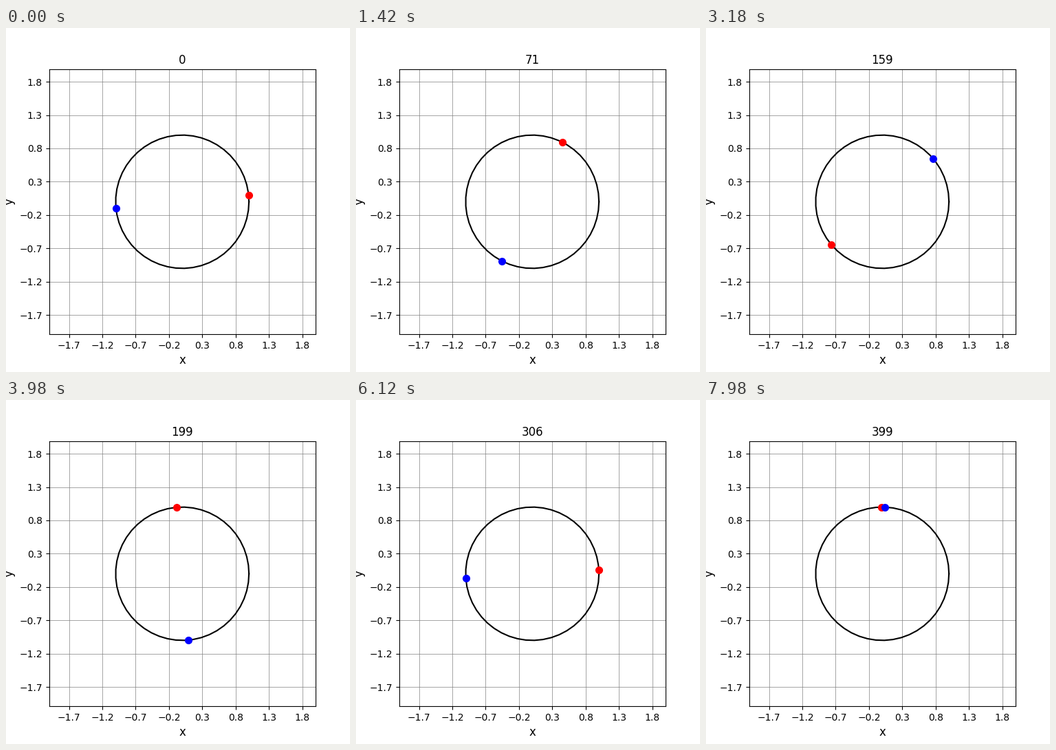
Recreate the animation shown at these times as a matplotlib script. Size 500 px wide and 500 px high, loop 8 s.

```python
import numpy as np
import matplotlib.pyplot as plt
from matplotlib.animation import FuncAnimation

FRAMES = 400
STEP = 0.1       # natural phase advance per step
COUPLING = 0.05  # pull between the two oscillators per step
LAG = 0.0508     # phase lag in the coupling


def simulate(frames):
    """Two lagged phase oscillators that start almost exactly in antiphase."""
    gap = 1.83e-15  # phase difference beyond pi
    mean = np.pi / 2
    red, blue = [], []
    for _ in range(frames):
        mean += STEP + COUPLING * np.sin(LAG) * np.cos(gap)
        red.append(mean - (np.pi + gap) / 2)
        blue.append(mean + (np.pi + gap) / 2)
        gap += 2 * COUPLING * np.cos(LAG) * np.sin(gap)
    return red, blue


red_phase, blue_phase = simulate(FRAMES)

fig, ax = plt.subplots(figsize=(5, 5), dpi=100)
# Same scale on both axes: trim the y range to the shape of the axes box.
box = ax.get_position()
y_max = 2 * box.height / box.width
ax.set_xlim(-2, 2)
ax.set_ylim(-y_max, y_max)
ticks = np.arange(-1.7, 1.9, 0.5)
ax.set_xticks(ticks)
ax.set_yticks(ticks)
ax.set_xlabel("x", fontsize=12)
ax.set_ylabel("y", fontsize=12)
ax.grid(color="gray", linewidth=0.5)
title = ax.set_title("0", fontsize=12)

angle = np.linspace(0, 2 * np.pi, 50)
ax.plot(np.cos(angle), np.sin(angle), color="black", linewidth=1.5)
red_dot, = ax.plot([], [], "o", color="red", markersize=7)
blue_dot, = ax.plot([], [], "o", color="blue", markersize=7)


def place(dot, phase):
    dot.set_data([np.cos(phase)], [np.sin(phase)])


def update(i):
    place(red_dot, red_phase[i])
    place(blue_dot, blue_phase[i])
    title.set_text(str(i))
    return red_dot, blue_dot, title


anim = FuncAnimation(fig, update, frames=FRAMES, interval=20,
                     repeat=True, repeat_delay=0, blit=False)
plt.show()
```
